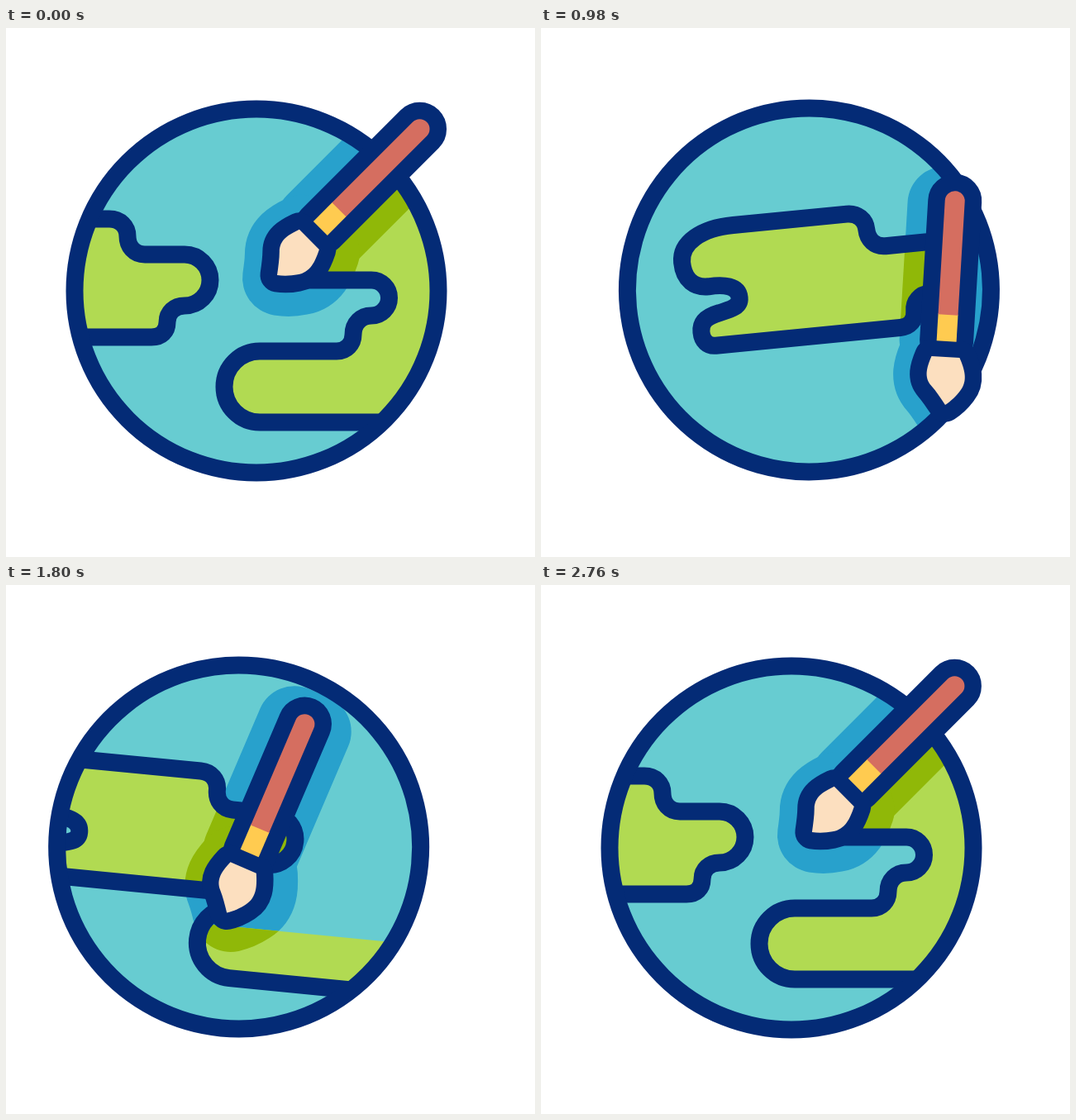
Recreate the animation shown at these times as an HTML page with a canvas. Size 640 by 640 pixels, loop 3240 ms.

```html
<!DOCTYPE html>
<html lang="en">
<head>
<meta charset="utf-8">
<title>Painting the globe</title>
<style>
  html, body { margin: 0; width: 100%; height: 100%; overflow: hidden; background: #fff; }
  canvas { display: block; width: 640px; height: 640px; }
</style>
</head>
<body>
<canvas id="stage" width="640" height="640"></canvas>
<script>
const ctx = document.getElementById('stage').getContext('2d');
const LOOP = 3240, RAD = Math.PI / 180, LINE = 21;
const NAVY = '#042b76', WATER = '#67ccd1', WATER_DARK = '#28a1cc';
const LAND = '#b1da52', LAND_DARK = '#90b808';
const RED = '#d56e60', YELLOW = '#ffcb50', CREAM = '#fcdfbf';
const CENTER = { x: 303, y: 318 }, PIVOT = { x: 303, y: 98 };
const PAINT_START = 1200, SWAP = 900;

// Land shapes, in globe coordinates at rest
const west = new Path2D(
  'M125 231H-13C-52 231-79 246-79 270C-79 292-66 302-50 302C-32 301-14 304-14 319' +
  'C-14 330-25 332-40 335C-56 338-64 344-64 356C-64 367-58 374-48 374H176C188 374 195 367 195 356' +
  'C195 344 204 336 216 336A31 31 0 0 0 216 274H168C155 274 147 264 147 252C147 240 138 231 125 231Z');
const coast = 'M463 477H307A43 43 0 0 1 307 391H400C412 391 420 382 420 371' +
  'C420 357 430 348 442 348A21.5 21.5 0 0 0 442 305';
const northCoast = 'H365Q343 305 343 281V260C343 247 352 241 366 230L480 122';
const east = new Path2D(coast + northCoast + 'L620 90V477Z');
const eastLine = new Path2D(coast + northCoast);
const paintedD = coast + 'H320';
const paintedLine = new Path2D(paintedD);
const guide = document.createElementNS('http://www.w3.org/2000/svg', 'path');
guide.setAttribute('d', paintedD);

// Brush parts: origin at the handle end, y towards the tip
const TIP = { x: 3, y: 247 };
const handle = new Path2D('M-12 0A12 12 0 0 1 12 0V170H-12Z');
const redPart = new Path2D('M-12 0A12 12 0 0 1 12 0V138H-12Z');
const handleShade = new Path2D('M-12 4H14V170H-12Z');
const bristles = new Path2D(
  'M-17 189H17C24 203 29 216 20 229C16 235 10 242 3 247C-3 239-9 231-15 225C-25 215-22 203-17 189Z');

const clamp01 = v => Math.min(1, Math.max(0, v));
const ease = (t, from, to) => (1 - Math.cos(Math.PI * clamp01((t - from) / (to - from)))) / 2;

// Smooth monotone curve through [time, value] keys
function track(keys, t) {
  const last = keys.length - 1;
  if (t <= keys[0][0]) return keys[0][1];
  if (t >= keys[last][0]) return keys[last][1];
  const slope = i => (keys[i + 1][1] - keys[i][1]) / (keys[i + 1][0] - keys[i][0]);
  const tangent = i => {
    if (i === 0 || i === last) return 0;
    const a = slope(i - 1), b = slope(i);
    return a * b <= 0 ? 0 : 2 * a * b / (a + b);
  };
  const i = keys.findIndex(k => k[0] > t) - 1;
  const h = keys[i + 1][0] - keys[i][0], u = (t - keys[i][0]) / h;
  const u2 = u * u, u3 = u2 * u;
  return (2 * u3 - 3 * u2 + 1) * keys[i][1] + (u3 - 2 * u2 + u) * h * tangent(i) +
    (3 * u2 - 2 * u3) * keys[i + 1][1] + (u3 - u2) * h * tangent(i + 1);
}

const tipX = [[200, 328], [500, 411], [860, 487], [980, 489], [1200, 481]];
const tipY = [[200, 299], [500, 389], [860, 450], [980, 456], [1200, 469]];
const tilt = [[200, 45], [500, 23.2], [880, 2.6], [980, 3.4], [1250, 38], [1540, 22.7],
  [2060, 24], [2360, 25.5], [2440, 29.2], [2720, 45]];
const drawn = [[1200, 0], [1540, 189], [2060, 367], [2440, 543], [2720, 633]];
const tipLift = [[1200, 0], [1540, 6.5], [2060, 5.6], [2440, 2.6], [2720, -6]];
const fillTop = [[1200, 478], [1540, 435.6], [2060, 391], [2440, 310.6], [2700, 80]];

const swing = t => -6 * ease(t, 200, 860) + 11.7 * ease(t, 860, 1870) - 5.7 * ease(t, 1870, 2600);
const spin = t => 233 * (ease(t, 200, 690) - ease(t, 910, 2760));

function turn(p, pivot, angle) {
  const c = Math.cos(angle), s = Math.sin(angle), x = p.x - pivot.x, y = p.y - pivot.y;
  return { x: pivot.x + x * c - y * s, y: pivot.y + x * s + y * c };
}

function brushPose(t) {
  const angle = track(tilt, t) * RAD;
  let tip = { x: track(tipX, t), y: track(tipY, t) };
  if (t >= PAINT_START) {
    const p = guide.getPointAtLength(track(drawn, t));
    tip = turn({ x: p.x, y: p.y + track(tipLift, t) }, PIVOT, swing(t) * RAD);
  }
  const reach = turn(TIP, { x: 0, y: 0 }, angle);
  return { x: tip.x - reach.x, y: tip.y - reach.y, angle };
}

function scoped(draw) {
  ctx.save();
  draw();
  ctx.restore();
}

function thicken(path, color, width) {
  ctx.fillStyle = ctx.strokeStyle = color;
  ctx.lineWidth = width;
  ctx.fill(path);
  ctx.stroke(path);
}

function inBrush(pose, draw) {
  scoped(() => {
    ctx.setTransform(1, 0, 0, 1, pose.x, pose.y);
    ctx.rotate(pose.angle);
    draw();
  });
}

function brushShade(pose, color) {
  inBrush(pose, () => {
    thicken(handleShade, color, 90);
    ctx.translate(5, 0);
    thicken(bristles, color, 91);
  });
}

function drawBrush(pose) {
  inBrush(pose, () => {
    thicken(handle, NAVY, 41);
    thicken(bristles, NAVY, 41);
    ctx.fillStyle = YELLOW;
    ctx.fillRect(-12, 137, 24, 33);
    ctx.fillStyle = RED;
    ctx.fill(redPart);
    ctx.fillStyle = CREAM;
    ctx.fill(bristles);
  });
}

function drawLand(shape, pose) {
  scoped(() => {
    ctx.clip(shape);
    ctx.fillStyle = LAND;
    ctx.fill(shape);
    brushShade(pose, LAND_DARK);
  });
}

function outline(path) {
  ctx.strokeStyle = NAVY;
  ctx.lineWidth = LINE;
  ctx.stroke(path);
}

function drawGlobe(t, pose) {
  const shift = spin(t);
  const disc = new Path2D();
  disc.arc(CENTER.x, CENTER.y, 220, 0, 2 * Math.PI);
  scoped(() => {
    ctx.clip(disc);
    ctx.fillStyle = WATER;
    ctx.fill(disc);
    brushShade(pose, WATER_DARK);

    scoped(() => {
      ctx.translate(shift, 0);
      drawLand(west, pose);
      outline(west);
      if (t < SWAP) {
        drawLand(east, pose);
        outline(eastLine);
      }
    });

    if (t >= PAINT_START) {
      scoped(() => {
        ctx.beginPath();
        ctx.rect(0, track(fillTop, t), 640, 640);
        ctx.clip();
        drawLand(east, pose);
      });
      ctx.setLineDash([Math.max(0.01, track(drawn, t)), 2000]);
      outline(paintedLine);
    }
  });
  outline(disc);
}

// Motion streak under the globe; side is -1 (left) or 1 (right)
function drawStreak(t, { side, x, y, start, middle, end, sweep }) {
  if (t <= start || t >= end) return;
  const head = sweep * RAD * ease(t, start, middle);
  const tail = sweep * RAD * ease(t, middle, end);
  scoped(() => {
    ctx.translate(CENTER.x, CENTER.y);
    ctx.scale(side, 1);
    ctx.beginPath();
    ctx.arc(x, y, 105, tail, Math.max(head, tail + 0.002));
    ctx.strokeStyle = YELLOW;
    ctx.lineWidth = LINE;
    ctx.stroke();
  });
}

function render(t) {
  ctx.setTransform(1, 0, 0, 1, 0, 0);
  ctx.fillStyle = '#fff';
  ctx.fillRect(0, 0, 640, 640);
  ctx.lineCap = ctx.lineJoin = 'round';
  const pose = brushPose(t);
  scoped(() => {
    ctx.translate(PIVOT.x, PIVOT.y);
    ctx.rotate(swing(t) * RAD);
    ctx.translate(-PIVOT.x, -PIVOT.y);
    drawStreak(t, { side: -1, x: 125, y: 157, start: 330, middle: 510, end: 790, sweep: 108 });
    drawStreak(t, { side: 1, x: 105, y: 153, start: 1080, middle: 1290, end: 1550, sweep: 70 });
    drawGlobe(t, pose);
  });
  drawBrush(pose);
}

const begin = performance.now();
function tick() {
  render((performance.now() - begin) % LOOP);
  requestAnimationFrame(tick);
}
tick();
</script>
</body>
</html>
```
